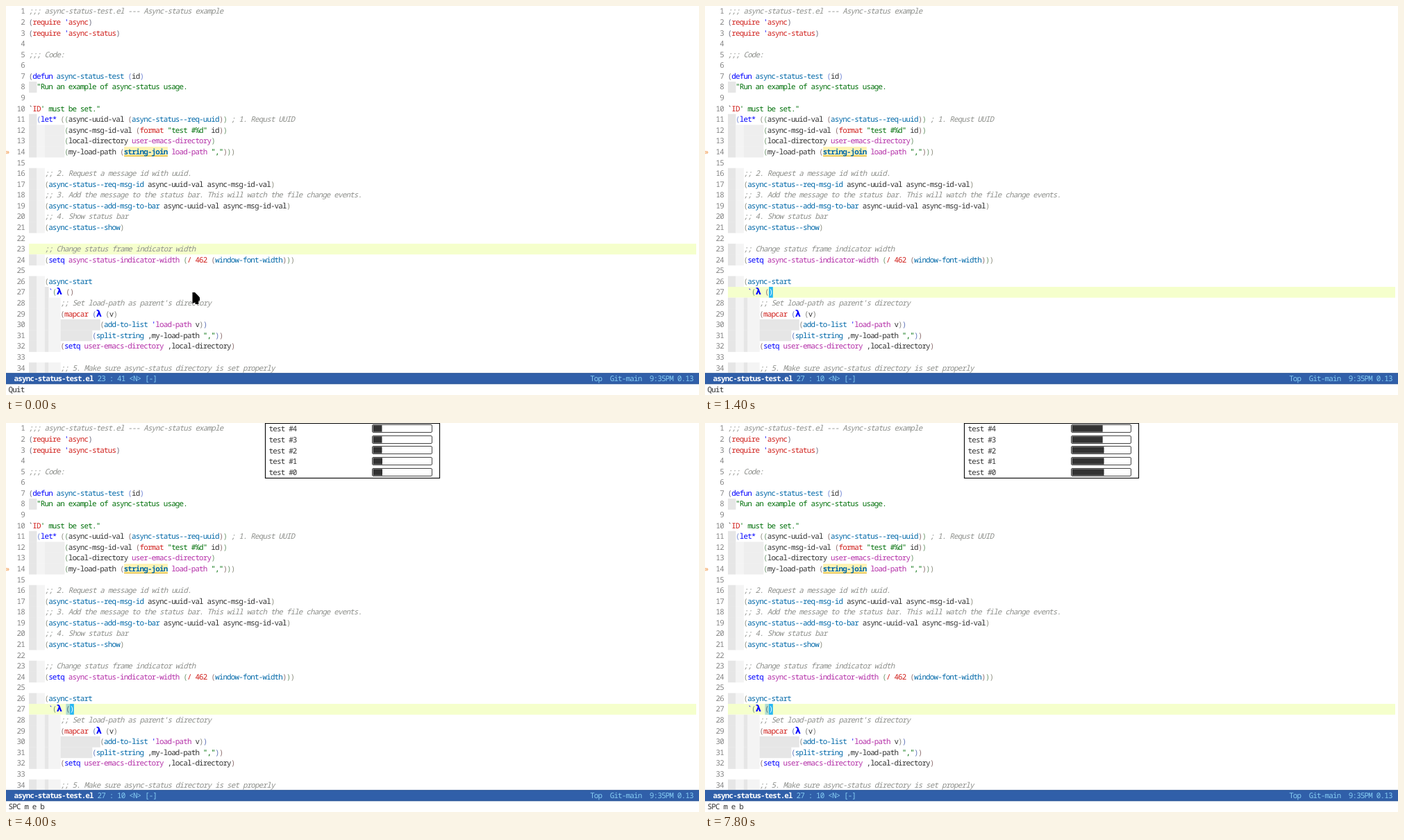
These frames come from a looping animation (998x561 px, 8000 ms). An HTML page with a canvas:

```html
<!DOCTYPE html>
<html lang="en">
<head>
<meta charset="utf-8">
<title>Async status bar in an editor</title>
<style>
  html, body { margin: 0; width: 100%; height: 100%; overflow: hidden; background: #fff; }
  canvas { display: block; width: 998px; height: 561px; }
</style>
</head>
<body>
<canvas id="stage"></canvas>
<script>
const W = 998, H = 561, LOOP = 8000;
const CELL = 5.71, ROW = 15.58, LIST_ROW = 15.07, LEFT = 33;
const BASE = 11.4, SIZE = 10.9, LAMBDA_CELLS = 1.35;
const FAMILY = '"Noto Sans Mono", "DejaVu Sans Mono", monospace';
const C = {
  text: '#333333', comment: '#8e908c', number: '#858585', keyword: '#0000ff',
  call: '#0068a8', builtin: '#d0201c', variable: '#b42fa8', string: '#00700a',
  line: '#f5ffcc', guide: '#e6e6e6', guideLight: '#f4f4f4', guideMid: '#eeeeee',
  mode: '#305fa9', modeText: '#86cdf3', cursor: '#25b6f2', match: '#b0dcd0',
  prompt: '#ffd000', selected: '#1c4f7c', list: '#107010'
};
const PARENS = ['#707183', '#7388d6', '#909183', '#709870', '#907373', '#6276ba', '#858580', '#80a880', '#887070'];

const canvas = document.getElementById('stage');
const ctx = canvas.getContext('2d');
const dpr = window.devicePixelRatio || 1;
canvas.width = Math.round(W * dpr);
canvas.height = Math.round(H * dpr);
ctx.scale(dpr, dpr);
ctx.textAlign = 'center';
ctx.textRendering = 'geometricPrecision';

const words = s => new Set(s.split(' '));
const KEYWORDS = words('defun let* setq');
const BUILTINS = words('require format mapcar / 462 async async-status');
const CALLS = words('async-status-test async-status--req-uuid async-status--req-msg-id ' +
  'async-status--add-msg-to-bar async-status--show window-font-width async-start add-to-list split-string');
const VARIABLES = words('user-emacs-directory load-path async-status-indicator-width');

const SOURCE = [
  ';;; async-status-test.el --- Async-status example',
  "(require 'async)",
  "(require 'async-status)",
  '',
  ';;; Code:',
  '',
  '(defun async-status-test (id)',
  [[C.text, '  '], [C.string, '"Run an example of async-status usage.']],
  '',
  [[C.text, '`'], [C.builtin, 'ID'], [C.string, '\' must be set."']],
  '  (let* ((async-uuid-val (async-status--req-uuid)) ; 1. Requst UUID',
  '         (async-msg-id-val (format "test #%d" id))',
  '         (local-directory user-emacs-directory)',
  '         (my-load-path (string-join load-path ",")))',
  '',
  '    ;; 2. Request a message id with uuid.',
  '    (async-status--req-msg-id async-uuid-val async-msg-id-val)',
  '    ;; 3. Add the message to the status bar. This will watch the file change events.',
  '    (async-status--add-msg-to-bar async-uuid-val async-msg-id-val)',
  '    ;; 4. Show status bar',
  '    (async-status--show)',
  '',
  '    ;; Change status frame indicator width',
  '    (setq async-status-indicator-width (/ 462 (window-font-width)))',
  '',
  '    (async-start',
  '     `(λ ()',
  "        ;; Set load-path as parent's directory",
  '        (mapcar (λ (v)',
  "                  (add-to-list 'load-path v))",
  '                (split-string ,my-load-path ","))',
  '        (setq user-emacs-directory ,local-directory)',
  '',
  '        ;; 5. Make sure async-status directory is set properly'
];

const COMMANDS = [
  ['list-packages', 'Display a list of packages.'],
  ['emacs-version', 'Display the version of Emacs that is running in this session.'],
  ['checkdoc', 'Interactively check the entire buffer for style errors.'],
  ['format-all-buffer', 'Auto-format the source code in the current buffer.'],
  ['flycheck-list-errors', 'Show the error list for the current buffer.', 'C-c ! l'],
  ['flycheck-package-setup', 'Setup flycheck-package.'],
  ['package-lint-current-buffer', 'Display lint errors and warnings for the current buffer.'],
  ['kconfig-ref-find-config-by-name', 'Find a kconfig from the database.'],
  ['kconfig-ref-init-db', 'Generate a new database and parse Kconfig(s) in the kernel source tree.'],
  ['edebug-defun (edebug-eval-top-level-form)', 'Evaluate the top level form point is in, stepping through with Edebug.'],
  ['kconfig-ref-parse-dotconfig', 'Update dot config to database.'],
  ['kconfig-ref-find-config-at-cursor', 'Find kconfig deinifition under the cursor.', 'SPC c q'],
  ['ripgrep-regexp', 'Run a ripgrep search with ‘REGEXP’ rooted at ‘DIRECTORY’.'],
  ['ert (ert-run-tests-interactively)', 'Run the tests specified by SELECTOR and display the results in a buffer.'],
  ['eshell', 'Create an interactive Eshell buffer.'],
  ['org-roam-ui-open', 'Ensure ‘org-roam-ui’ is running, then open the ‘org-roam-ui’ webpage.']
];

// Cursor stops: start time, line, column, column on screen, character below.
const STOPS = [
  [130, 24, 41, 41, ' '], [200, 25, 0, 0, ' '], [270, 26, 15, 15, 't'], [330, 27, 10, 9 + LAMBDA_CELLS, ')']
];

// Bar growth: times for rows #3-4, #2 and #0-1, then the right edges they reach.
const GROWTH = [
  [2600, 2600, 2530, 530, 530, 530],
  [3000, 2930, 3130, 533.5, 533.5, 535],
  [3530, 3470, 3600, 538.2, 538.2, 539],
  [3930, 3870, 4000, 541.5, 541.5, 542],
  [4400, 4330, 4530, 545.3, 545.3, 548],
  [4800, 4730, 4930, 548.4, 548.4, 551],
  [5200, 5130, 5330, 551.4, 551.4, 554],
  [5600, 5530, 5730, 555.3, 554, 558],
  [6000, 5930, 6070, 558.3, 558, 560],
  [6470, 6470, 6330, 562.2, 562.2, 563],
  [6800, 6670, 6670, 563.5, 565, 566],
  [7000, 7070, 7070, 567.3, 568, 568],
  [7400, 7470, 7330, 570.3, 571, 571],
  [7730, 7800, 7800, 572.7, 574.6, 574.6]
];

// Split the code into coloured runs; brackets take their colour from the depth.
const CODE = (() => {
  let depth = 0;
  const style = token => {
    if (token[0] === ';') return { color: C.comment, look: 'italic' };
    if (token[0] === '"') return { color: C.string };
    if (token === '(') return { color: PARENS[depth++ % 9] };
    if (token === ')') return { color: PARENS[--depth % 9] };
    if (token === 'string-join') return { color: C.call, look: 'bold', flag: true };
    if (/^['`λ]$/.test(token) || KEYWORDS.has(token)) return { color: C.keyword };
    if (BUILTINS.has(token)) return { color: C.builtin };
    if (CALLS.has(token)) return { color: C.call };
    if (VARIABLES.has(token)) return { color: C.variable };
    return { color: C.text };
  };
  return SOURCE.map((line, i) => {
    if (typeof line !== 'string') {
      if (i === 7) depth = 1;
      return line.map(([color, text]) => ({ color, text }));
    }
    const tokens = line.match(/;.*|"[^"]*"|[()'`,]|\s+|[^\s()'`,";]+/g) || [];
    return tokens.map(text => ({ text, ...style(text) }));
  });
})();

function rect(x, y, w, h, color) {
  ctx.fillStyle = color;
  ctx.fillRect(x, y, w, h);
}

// Draw text on the character grid and return the x after it.
function write(text, x, y, color, look = '') {
  const font = `${look} ${SIZE}px ${FAMILY}`;
  ctx.fillStyle = color;
  for (const ch of text) {
    const wide = ch === 'λ';
    const w = wide ? CELL * LAMBDA_CELLS : CELL;
    ctx.font = wide ? 'bold 13px "DejaVu Sans", sans-serif' : font;
    if (ch !== ' ') ctx.fillText(ch, x + w / 2, y);
    x += w;
  }
  return x;
}

function guides(indent, line, y) {
  const inner = line >= 27;
  const edges = inner ? [0, 2, 4, 5, 8, 99] : [0, 2, 4, 99];
  const colors = [C.guide, C.guideLight, inner ? C.guide : C.guideMid, C.guideLight, C.guide];
  for (let i = 0; i + 1 < edges.length && edges[i] < indent; i++) {
    const end = Math.min(edges[i + 1], indent);
    rect(LEFT + edges[i] * CELL, y, (end - edges[i]) * CELL, ROW + 0.3, colors[i]);
  }
}

function drawLine(line, y, current) {
  const runs = CODE[line - 1], base = y + BASE;
  if (current) rect(LEFT, y, 961, ROW, C.line);
  else if (runs.length && /^ +$/.test(runs[0].text)) guides(runs[0].text.length, line, y);
  const label = String(line);
  write(label, LEFT - CELL * (label.length + 1), base, C.number);
  let x = LEFT;
  for (const run of runs) {
    const w = run.text.length * CELL;
    if (run.flag) {
      rect(x, y + 0.5, w, 14, '#fff3b4');
      rect(x, y + 13.2, w, 1.2, '#e0b020');
    }
    x = write(run.text, x, base, run.color, run.look);
  }
  if (line === 14) write('»', -0.6, base, '#f0903c');
}

function drawBuffer(s) {
  const top = s.menu ? 10 : 1;
  const bottom = s.menu ? 289 : 529;
  ctx.save();
  ctx.beginPath();
  ctx.rect(0, 0, W, bottom);
  ctx.clip();
  const yOf = line => (line - top) * ROW;
  for (let line = top; line <= SOURCE.length && yOf(line) < bottom; line++) {
    drawLine(line, yOf(line), line === s.line);
  }
  if (s.cursor) {
    const x = LEFT + s.x * CELL, y = yOf(s.line);
    if (s.match) {
      rect(x - CELL, y, CELL, ROW, C.match);
      write('(', x - CELL, y + BASE, '#55777a');
    }
    rect(x, y, CELL, ROW, C.cursor);
    write(s.under, x, y + BASE, '#ffffff');
  }
  ctx.restore();
}

function drawModeLine(s) {
  const y = s.menu ? 289 : 529.4, base = y + 11.7;
  rect(0, y, W, 15.8, C.mode);
  rect(0, y, W, 0.8, '#26508f');
  rect(0, y + 15, W, 0.8, '#26508f');
  const x = write('async-status-test.el', 12, base, '#ffffff', 'bold');
  write(` ${s.line} : ${s.col} <N> [-]`, x, base, C.modeText);
  const right = `${s.menu ? '9%' : 'Top'}  Git-main  9:35PM 0.13`;
  write(right, 990 - right.length * CELL, base, C.modeText);
}

function drawMenu() {
  rect(4, 305, 9 * CELL, 15, C.prompt);
  write('8479 M-x', 4, 316.4, '#000000', 'bold');
  rect(4 + 9 * CELL, 305, CELL, 15, C.cursor);
  rect(4, 320, 990, 15, C.selected);
  COMMANDS.forEach(([name, about, keys], i) => {
    const base = 320 + i * LIST_ROW + BASE;
    const color = i ? C.text : '#ffffff';
    let x = write(name, 4, base, color);
    if (keys) {
      x = write(' (', x, base, color);
      x = write(keys, x, base, C.keyword);
      write(')', x, base, color);
    }
    write(about, 352.6, base, i ? C.list : '#ffffff');
  });
}

function barEdge(id, t) {
  const group = id > 2 ? 0 : id === 2 ? 1 : 2;
  let edge = 0;
  for (const step of GROWTH) if (t >= step[group]) edge = step[group + 3];
  return edge;
}

function drawStatus(rows, t) {
  const h = Math.round(rows * 15.6 + 1.5);
  rect(373, 0, 252, h, '#ffffff');
  ctx.lineWidth = 1.2;
  ctx.strokeStyle = '#111111';
  ctx.strokeRect(373.5, 0.5, 251, h - 1);
  ctx.lineWidth = 1;
  ctx.strokeStyle = '#444444';
  for (let i = 0; i < rows; i++) {
    const id = rows - 1 - i, y = Math.round(2 + i * 15.7) + 0.5;
    write('test #' + id, 379, 1 + i * ROW + BASE, C.text);
    ctx.beginPath();
    ctx.roundRect(527.5, y, 86, 11, 1.5);
    ctx.stroke();
    const edge = barEdge(id, t);
    if (edge) rect(528.5, y + 0.8, edge - 528.5, 9.4, '#333333');
  }
}

function drawPointer() {
  const outline = [[268.5, 413], [272, 413], [277, 418], [279, 420.5], [279, 425],
    [277, 425.5], [277.5, 430], [272.5, 430], [272.5, 427.5], [268.5, 429]];
  ctx.beginPath();
  outline.forEach(([x, y]) => ctx.lineTo(x, y));
  ctx.fillStyle = '#000000';
  ctx.fill();
}

function stateAt(t) {
  const s = { line: 23, col: 41, x: 41, under: 'h', cursor: t >= 130 };
  for (const [start, line, col, x, under] of STOPS) {
    if (t >= start) Object.assign(s, { line, col, x, under });
  }
  s.menu = t >= 730 && t < 1400;
  if (s.menu) s.cursor = false;
  s.match = t >= 1470;
  s.rows = Math.max(0, Math.min(5, Math.floor((t - 1670) / 65) + 1));
  s.echo = t < 130 || (t >= 1400 && t < 1530) ? 'Quit' : t >= 1600 ? 'SPC m e b' : '';
  return s;
}

function draw(t) {
  const s = stateAt(t);
  rect(0, 0, W, H, '#ffffff');
  drawBuffer(s);
  drawModeLine(s);
  if (s.menu) drawMenu();
  else write(s.echo, 4, 557.3, C.text);
  if (s.rows) drawStatus(s.rows, t);
  if (t < 130) drawPointer();
}

const start = performance.now();
function tick() {
  draw((performance.now() - start) % LOOP);
  requestAnimationFrame(tick);
}
tick();
</script>
</body>
</html>
```
